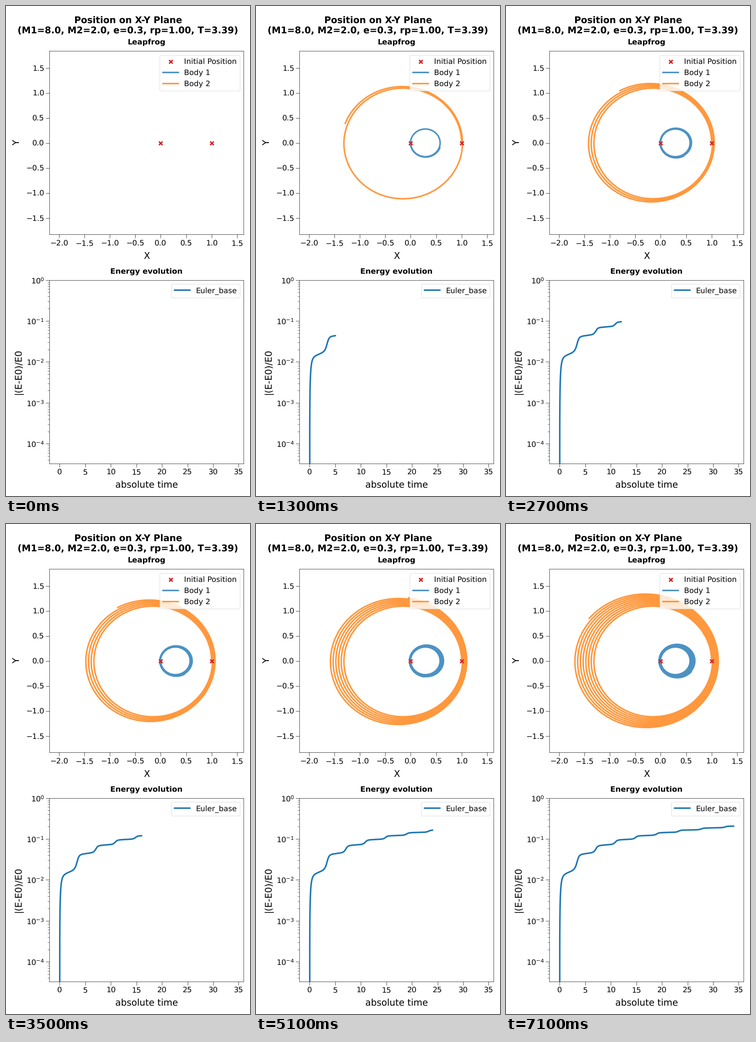
Write a matplotlib script that moves like this. It is 529 px wide and 1058 px high and loops after 8000 ms.

```python
import numpy as np
import matplotlib.pyplot as plt
from matplotlib.animation import FuncAnimation

W, H, DPI = 529, 1058, 64
INTERVAL, FRAMES = 100, 80


def px(n):
    """Pixels to points."""
    return n * 72 / DPI


SMALL, BIG = px(16.4), px(19.7)

plt.rcParams.update({
    "font.family": "DejaVu Sans",
    "font.size": SMALL,
    "text.hinting": "no_hinting",
    "axes.linewidth": px(0.7),
    "lines.linewidth": px(3.3),
    "patch.linewidth": px(0.82),
    "legend.fontsize": SMALL,
    "legend.loc": "upper right",
    "legend.labelspacing": 0.535,
    "legend.borderpad": 0.42,
})
for axis, pad in (("xtick", 3.6), ("ytick", 2.9)):
    plt.rcParams.update({
        f"{axis}.labelsize": SMALL,
        f"{axis}.major.size": px(8.2),
        f"{axis}.minor.size": px(4.1),
        f"{axis}.major.width": px(0.7),
        f"{axis}.minor.width": px(0.55),
        f"{axis}.major.pad": px(pad),
    })

# Two-body problem, G = 1, started at periapsis
M1, M2, ECC, RP = 8.0, 2.0, 0.3, 1.0
M = M1 + M2
PERIOD = 2 * np.pi * np.sqrt((RP / (1 - ECC)) ** 3 / M)
DT, T_END = 0.001, 34
PER_UNIT = round(1 / DT)


def integrate():
    """Explicit Euler steps of the relative orbit, with its energy."""
    x, y, vx, vy = RP, 0.0, 0.0, (M * (1 + ECC) / RP) ** 0.5
    rows = []
    for _ in range(T_END * PER_UNIT + 1):
        r = (x * x + y * y) ** 0.5
        rows.append((x, y, (vx * vx + vy * vy) / 2 - M / r))
        k = M / r ** 3
        x, y, vx, vy = x + vx * DT, y + vy * DT, vx - k * x * DT, vy - k * y * DT
    return np.array(rows).T


rx, ry, energy = integrate()
time = np.arange(rx.size) * DT
error = np.abs((energy - energy[0]) / energy[0])
center = RP * M2 / M
body1 = center - rx * M2 / M, -ry * M2 / M
body2 = center + rx * M1 / M, ry * M1 / M

fig = plt.figure(figsize=(W / DPI, H / DPI), dpi=DPI, facecolor="white")
LEFT, RIGHT = 94.3, 515.4
MID = (LEFT + RIGHT) / 2


def add_axes(top, bottom):
    return fig.add_axes([LEFT / W, 1 - bottom / H,
                         (RIGHT - LEFT) / W, (bottom - top) / H])


def put(x, y, text, size=BIG, **kw):
    """Text centred on x with its baseline at y, in pixels from the top left."""
    fig.text(x / W, 1 - y / H, text, fontsize=size, ha="center", va="baseline",
             rotation_mode="anchor", **kw)


def span(values, margin):
    return values.min() - margin, values.max() + margin


put(W / 2, 37, "Position on X-Y Plane", weight="bold")
put(W / 2, 59, f"(M1={M1}, M2={M2}, e={ECC}, rp={RP:.2f}, T={PERIOD:.2f})",
    weight="bold")

# Orbits
orbit = add_axes(97.3, 493.4)
orbit.set_xticks(np.arange(-2, 1.6, 0.5))
orbit.set_yticks(np.arange(-1.5, 1.6, 0.5))
orbit.set_xlim(span(body2[0], 0.5))
orbit.set_ylim(span(body2[1], 0.5))
orbit.scatter([0, RP], [0, 0], s=px(7.8) ** 2, marker="x", color="tab:red",
              linewidths=px(3), zorder=3, label="Initial Position")
line1, = orbit.plot([], [], color="tab:blue", alpha=0.8, label="Body 1")
line2, = orbit.plot([], [], color="tab:orange", alpha=0.8, label="Body 2")
orbit.legend()
put(MID, 83, "Leapfrog", SMALL, weight="bold")
put(MID, 546, "X")
put(29, 295.3, "Y", rotation=90)

# Energy error
drift = add_axes(591.6, 988)
drift.set_xticks(np.arange(0, 36, 5))
drift.set_xlim(span(time, 2))
drift.set_yscale("log")
drift.set_ylim(error[1], 1)
line3, = drift.plot([], [], color="tab:blue", label="Euler_base")
drift.legend()
put(MID, 577.5, "Energy evolution", SMALL, weight="bold")
put(MID, 1040, "absolute time")
put(33, 789.8, "|(E-E0)/E0", rotation=90)


def update(i):
    # One time unit every second tick after the opening hold
    t = 0 if i < 5 else min(T_END, (i - 3) // 2)
    n = t * PER_UNIT + 1 if t else 0
    line1.set_data(body1[0][:n], body1[1][:n])
    line2.set_data(body2[0][:n], body2[1][:n])
    line3.set_data(time[:n], error[:n])
    return line1, line2, line3


anim = FuncAnimation(fig, update, frames=FRAMES, interval=INTERVAL,
                     repeat=True, repeat_delay=0)
plt.show()
```
